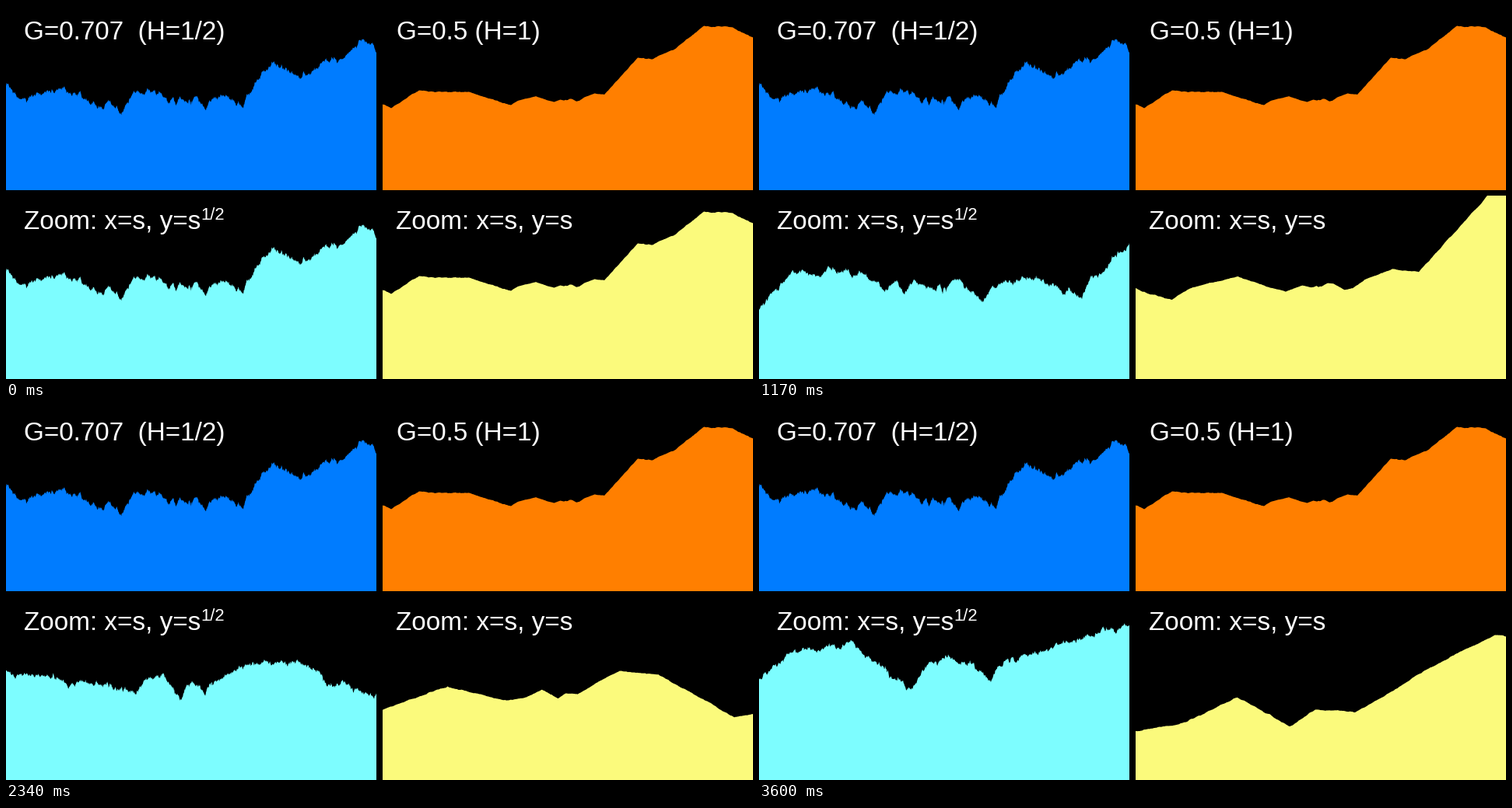
Write a matplotlib script that moves like this. It is 960 px wide and 480 px high and loops after 3630 ms.

```python
import numpy as np
import matplotlib.pyplot as plt
from matplotlib.animation import FuncAnimation
from matplotlib.patches import Polygon, Rectangle

W, H, DPI = 960, 480, 100
STEPS = 120
MAX_ZOOM = 60
HALF = 238          # half the width of a panel
CORE = HALF / MAX_ZOOM
TOP_SHIFT = 239     # distance from a lower panel to the one above it

# Main peaks and valleys around the zoom centre; the rest is fractal noise.
ROUGH = [(-238, -16), (-218, 1), (-167, -13), (-113, 15), (-107, 3), (-90, 21),
         (-77, -3), (-53, -10), (-38, -7), (-28, 6), (-23, -2), (-19.6, 9),
         (-15, -2), (-7, 4), (-3.8, 6.3), (-3.4, 3.3), (-2.1, 0.8), (-0.8, 8.8),
         (-0.2, 4.1), (0.5, 4.8), (1, 7.5), (1.3, 4), (4, -2), (8, -2),
         (18.6, 15), (23, 4), (39, -4), (67, 13), (71, -4), (106, -47),
         (140, -25), (190, -50), (223, -73), (238, -59)]
SMOOTH = [(-238, 6), (-226, 11), (-190, -12), (-126, -10), (-72, 7), (-62, 1),
          (-40, -4.4), (-25, 0.9), (-16.5, 3), (-8.5, 0), (-4.3, 1), (-3.1, 0.83),
          (-1.77, 0.24), (-0.65, 0.86), (-0.1, 0.5), (0.75, 0.56), (2.07, -0.24),
          (3.74, -1.1), (6.5, -0.85), (11.9, 2.2), (15.9, 1.45), (22, -2.9),
          (35.7, -8), (48, -6.5), (91, -54), (110, -52), (137, -64), (176, -95),
          (213, -93), (239, -80)]


def zoom(step):
    u = step / STEPS
    return MAX_ZOOM ** (u * u * (3 - 2 * u))


class Curve:
    """A self-similar skyline that can be zoomed about its centre."""

    def __init__(self, points, cx, mid, hurst, drift, noise, seed):
        self.cx, self.mid, self.hurst, self.drift = cx, mid, hurst, drift
        self.x, self.v = self.roughen(points, noise, seed)

    def roughen(self, points, noise, seed):
        """Midpoint displacement down to less than a pixel at any zoom."""
        rng = np.random.default_rng(seed)
        x, v = np.array(points).T
        while True:
            gap = np.diff(x)
            centre = (x[1:] + x[:-1]) / 2
            reach = np.maximum(np.abs(centre), CORE)
            i = np.flatnonzero(gap > 0.8 * reach / HALF)
            if not len(i):
                return x, v
            size = np.minimum(gap, 0.06 * reach)[i]
            kick = noise * size ** self.hurst * rng.normal(size=len(i))
            new = (v[i] + v[i + 1]) / 2 + kick
            x, v = np.insert(x, i + 1, centre[i]), np.insert(v, i + 1, new)

    def outline(self, s, shift=0):
        near = np.abs(self.x * s) < HALF + 12
        x = self.cx + self.x[near] * s
        y = self.mid + self.v[near] * s ** self.hurst - self.drift * s - shift
        x = np.concatenate([[x[0] - 9, x[0] - 9], x, [x[-1] + 9, x[-1] + 9]])
        y = np.concatenate([[H + 9, y[0]], y, [y[-1], H + 9]])
        return np.column_stack([x, y])


rough = Curve(ROUGH, 238, 359, hurst=0.5, drift=1.05, noise=0.9, seed=7)
smooth = Curve(SMOOTH, 721, 359.5, hurst=1, drift=0, noise=0.05, seed=4)

fig = plt.figure(figsize=(W / DPI, H / DPI), dpi=DPI, facecolor="black")
ax = fig.add_axes([0, 0, 1, 1])
ax.set_xlim(0, W)
ax.set_ylim(H, 0)
ax.axis("off")


def panel(curve, color, left, right, top, bottom, shift=0):
    area = Polygon(curve.outline(1, shift), closed=True, facecolor=color, linewidth=0)
    ax.add_patch(area)
    area.set_clip_path(Rectangle((left, top), right - left, bottom - top,
                                 transform=ax.transData))
    return area


def label(x, y, text, size=33.3):
    ax.text(x, y, text, color="white", family="Liberation Sans",
            fontsize=size * 72 / DPI, va="baseline", ha="left")


panel(rough, "#007cff", 0, 476, 0, 236.5, TOP_SHIFT)
panel(smooth, "#ff7f00", 483.5, W, 0, 236.5, TOP_SHIFT)
zoomed = [(rough, panel(rough, "#7dfdff", 0, 476, 243.5, H)),
          (smooth, panel(smooth, "#fbfa7c", 483.5, W, 243.5, H))]

label(23, 43, "G=0.707  (H=1/2)")
label(502, 43, "G=0.5 (H=1)")
label(23, 287, "Zoom: x=s, y=s")
label(250, 275, "1/2", 22)
label(501, 287, "Zoom: x=s, y=s")


def draw(i):
    s = zoom(max(0, i - 1))     # the opening view is held twice as long
    for curve, area in zoomed:
        area.set_xy(curve.outline(s))
    return [area for _, area in zoomed]


anim = FuncAnimation(fig, draw, frames=STEPS + 1, interval=30, repeat=True,
                     repeat_delay=0)
plt.show()
```
